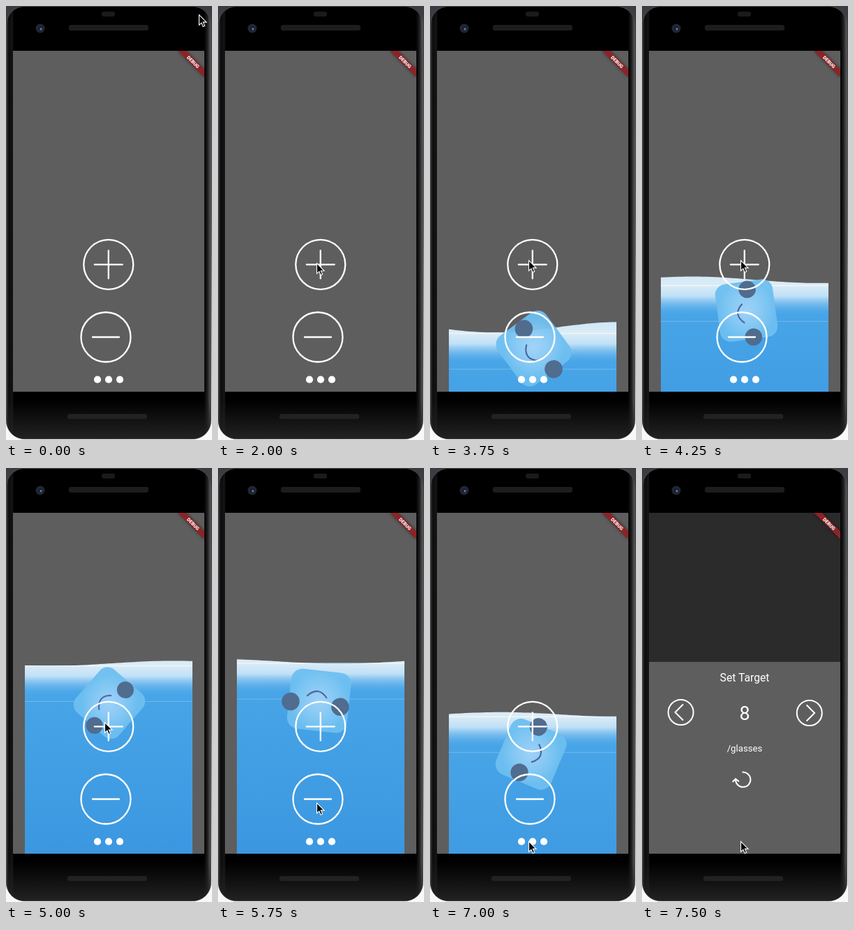
An HTML page for the animation above (8000 ms loop, 295 px wide and 620 px high).

```html
<!DOCTYPE html>
<html lang="en">
<head>
<meta charset="utf-8">
<title>Water tracker</title>
<style>
  html, body { margin: 0; width: 100%; height: 100%; overflow: hidden; background: #fff; }
  svg { display: block; width: 295px; height: 620px; }
  text { font-family: Roboto, sans-serif; fill: #fff; text-anchor: middle; }
  .line { fill: none; stroke: #fff; stroke-width: 2.3; stroke-linecap: round; }
  .thin { fill: none; stroke: #fff; stroke-width: 2; }
  .band { filter: drop-shadow(0 0 2px rgba(0, 0, 0, .5)); }
</style>
</head>
<body>
<svg viewBox="0 0 295 620" xmlns="http://www.w3.org/2000/svg">
  <defs>
    <clipPath id="screen"><rect x="10" y="64" width="274" height="487"/></clipPath>
    <linearGradient id="room" x2="0" y2="1">
      <stop offset="0" stop-color="#3b3c42"/><stop offset=".5" stop-color="#6a6a6c"/><stop offset=".95" stop-color="#f8f8f8"/>
    </linearGradient>
    <linearGradient id="edge">
      <stop offset="0" stop-color="#3c3d3f"/><stop offset=".012" stop-color="#0c0c0d"/>
      <stop offset=".03" stop-color="#151516"/><stop offset=".036" stop-color="#000"/>
      <stop offset=".966" stop-color="#000"/><stop offset=".982" stop-color="#1b1b1c"/>
      <stop offset="1" stop-color="#5c5d5f"/>
    </linearGradient>
    <linearGradient id="chin" x2="0" y2="1">
      <stop offset=".91" stop-color="#222" stop-opacity="0"/><stop offset="1" stop-color="#222"/>
    </linearGradient>
    <linearGradient id="deep" gradientUnits="userSpaceOnUse" x1="0" y1="0" x2="0" y2="270">
      <stop offset="0" stop-color="#4aa7e8"/><stop offset="1" stop-color="#3b97e0"/>
    </linearGradient>
    <linearGradient id="foam" gradientUnits="userSpaceOnUse" x1="0" y1="-24" x2="0" y2="44">
      <stop offset="0" stop-color="#c8e6f8"/><stop offset=".35" stop-color="#dcecf5"/>
      <stop offset=".58" stop-color="#d4eafa" stop-opacity=".85"/>
      <stop offset="1" stop-color="#4aa7e8" stop-opacity="0"/>
    </linearGradient>
    <radialGradient id="ice">
      <stop offset="0" stop-color="#a3d4f8"/><stop offset=".55" stop-color="#88caf5"/><stop offset="1" stop-color="#6dbff0"/>
    </radialGradient>
  </defs>

  <rect width="295" height="620" fill="url(#room)"/>
  <rect x=".5" y=".5" width="293" height="618" rx="26" fill="url(#edge)" stroke="#4c4d50"/>
  <rect x="1" y="1" width="292" height="617" rx="25" fill="url(#chin)"/>
  <rect x="137" y="8" width="19" height="7" rx="3" fill="#1b1b1c"/>
  <rect x="90" y="27" width="114" height="8" rx="3" fill="#1d1d1e"/>
  <rect x="88" y="583" width="114" height="7" rx="3" fill="#222223"/>
  <circle cx="49" cy="32" r="6.5" fill="#25272e"/>
  <circle cx="49" cy="32" r="3.6" fill="#15213f"/>
  <circle cx="50" cy="33" r="1.4" fill="#6b87bd"/>

  <g clip-path="url(#screen)">
    <rect x="10" y="64" width="274" height="487" fill="#5e5e5e"/>
    <g id="water">
      <rect x="27" width="240" height="320" fill="url(#deep)"/>
      <path id="wave" fill="url(#foam)"/>
      <rect x="27" y="0" width="240" height="1" fill="#fff" opacity=".7"/>
      <rect x="27" y="51" width="240" height="1" fill="#fff" opacity=".22"/>
    </g>
    <g id="cube">
      <rect x="-40.5" y="-40.5" width="81" height="81" rx="15" fill="url(#ice)" opacity=".95"/>
      <g fill="#506c8e">
        <ellipse class="eye" cx="-29" cy="-5" rx="12"/>
        <ellipse class="eye" cx="38" cy="-5" rx="12"/>
      </g>
      <path d="M-10 4.5Q3 20.5 17 4.5" fill="none" stroke="#4f639c" stroke-width="2"/>
    </g>

    <g id="plus">
      <circle class="line" r="35.5"/><path class="line" d="M-20 0H20M0-20V20"/>
    </g>
    <g transform="translate(143 473)">
      <circle class="line" r="35.5"/><path class="line" d="M-19 0H19"/>
    </g>
    <g fill="#fff">
      <circle cx="131" cy="533.7" r="5.1"/><circle cx="147" cy="533.7" r="5.1"/><circle cx="163" cy="533.7" r="5.1"/>
    </g>

    <rect id="shade" x="10" y="64" width="274" height="487"/>
    <g id="sheet">
      <rect x="10" y="277" width="274" height="274" fill="#5e5e5e"/>
      <text x="147" y="305" font-size="15.7">Set Target</text>
      <text x="147" y="360" font-size="27">8</text>
      <text x="147" y="405" font-size="13.2">/glasses</text>
      <circle class="thin" cx="55.6" cy="349" r="18"/><path class="thin" d="M59 337.5L47.5 349L59 360.5"/>
      <circle class="thin" cx="239.8" cy="350" r="18"/><path class="thin" d="M235.6 338.5L247.1 350L235.6 361.5"/>
      <path class="thin" d="M143.5 434.5A10.7 10.7 0 1 1 134 445M129.7 448.5L134 444L139 448"/>
    </g>

    <path class="band" d="M246.3 64H257.6L284 90.4V101.7Z" fill="#8c2427"/>
    <text transform="translate(268 80) rotate(45)" y="2.4" font-size="6.8" font-weight="900">DEBUG</text>
  </g>

  <path id="cursor" d="M0 0V16L3.7 12.6L6.2 18.4L8.9 17.2L6.4 11.6H11.5Z" fill="#050505" stroke="#fff" stroke-width="1.2"/>
</svg>

<script>
const LOOP = 8, STEP = .25;   // seconds
const FILL = 3.25;            // time at which the water level is well in view
const $ = id => document.getElementById(id);
const eyes = document.querySelectorAll('.eye');

const { PI, sin, cos, exp, max, min, abs } = Math;
const part = (t, from, to) => max(0, min(1, (t - from) / (to - from)));
const smooth = (t, from, to) => {
  const k = part(t, from, to);
  return k * k * (3 - 2 * k);
};

function place(id, x, y, extra = '') {
  $(id).setAttribute('transform', `translate(${x} ${y}) ${extra}`);
}

// Rises ever faster, stops at the peak, then drains slowly.
function waterLevel(t) {
  const v = t - FILL;
  const rise = 528 - 113.6 * v - 15.4 * v * v;
  return max(rise, 256 + 61 * max(0, t - 5.38));
}

// A wide sine that calms down and slows as the water settles.
function surface(t) {
  const v = max(0, t - FILL);
  const base = -8.5 + 6 * smooth(t, 4, 5.2);
  const height = 3.5 + 14 * exp(-2.5 * v);
  const crest = 65 + 867 * (1 - exp(-.55 * v));
  let d = 'M27 44';
  for (let x = 27; x <= 267; x += 6) {
    d += `L${x} ${(base - height * cos((x - crest) * PI / 180)).toFixed(2)}`;
  }
  return d + 'V44Z';
}

function drawCube(t, level) {
  const v = t - FILL;
  const x = 146.5 + 3 * cos(1.5 * (t - 4.3));
  const depth = 18 + 36 * smooth(t, 3.4, 5.1);
  const angle = 27.5 + 49 * v + 5.8 * v * v;
  const size = 1 + .045 * (1 + cos(2.06 * v));
  place('cube', x, level + depth, `rotate(${angle}) scale(${size})`);
  const lid = 12 * min(1, .2 + 4 * abs(t - 6.25));
  eyes.forEach(eye => eye.setAttribute('ry', lid));
}

function drawCursor(t) {
  const sweep = part(t, 0, 1.25);
  const x = 276.5 - 135 * sweep - 85 * sin(PI * sweep);
  const y = 12.5 + 358 * smooth(t, 0, 1.25) - 7 * smooth(t, 1.8, 2.25)
    + 115 * smooth(t, 5.25, 5.75) + 55 * smooth(t, 6.25, 6.75);
  place('cursor', x, y, 'scale(.92)');
}

function draw(t) {
  const level = waterLevel(t);
  place('water', 0, level);
  $('wave').setAttribute('d', surface(t));
  drawCube(t, level);

  const press = max(0, 1 - abs(t - 2.75) / STEP);
  place('plus', 146.8, 369.3, `scale(${1 + .18 * press})`);

  const open = 1 - (1 - part(t, 7, 7.5)) ** 2;
  $('shade').setAttribute('opacity', .54 * open);
  place('sheet', 0, 274 * (1 - open));
  drawCursor(t);
}

function tick(now) {
  draw(Math.floor(now / 1000 % LOOP / STEP) * STEP);
  requestAnimationFrame(tick);
}
tick(performance.now());
</script>
</body>
</html>
```
